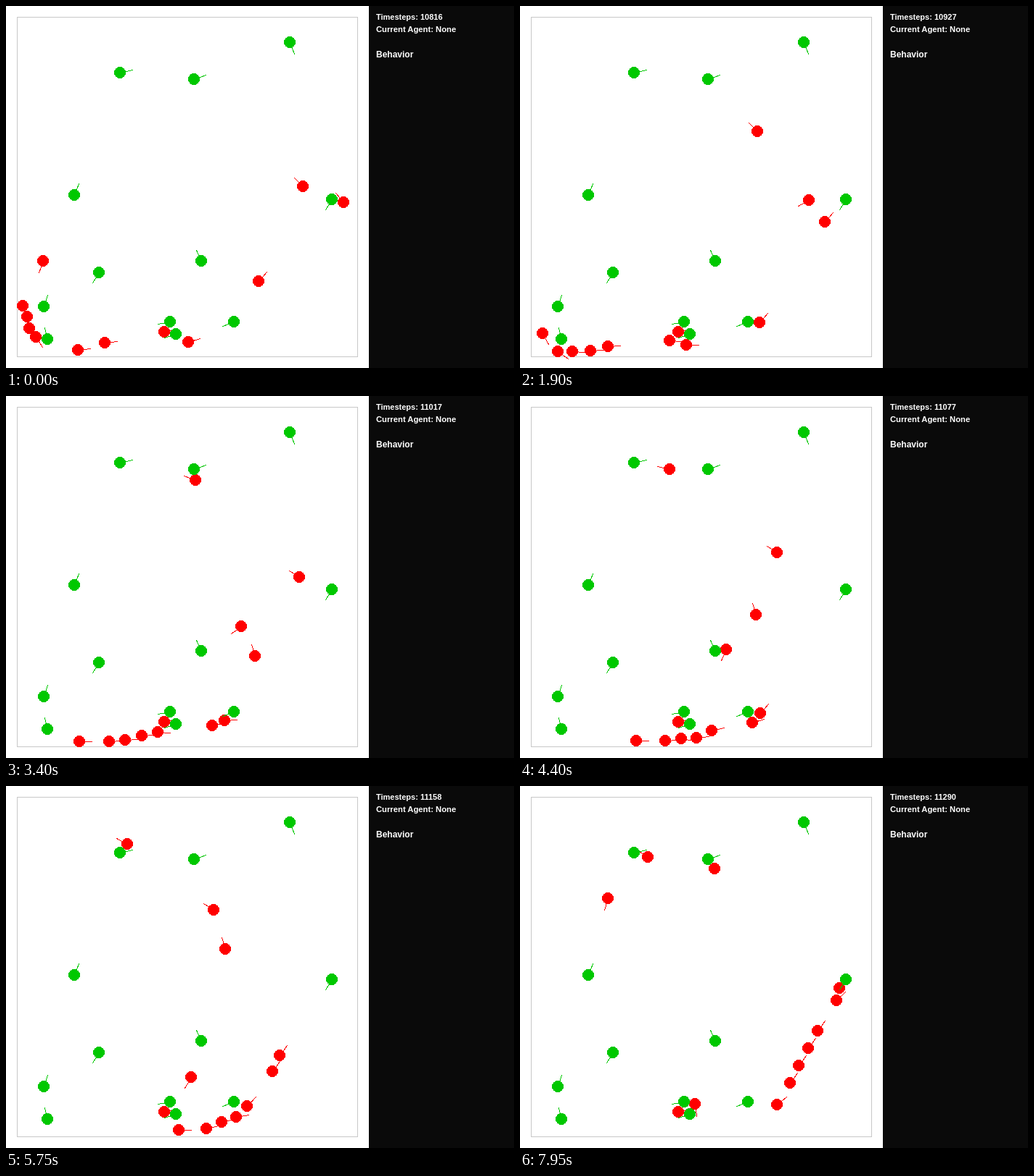
Write an HTML page that moves like this. It is 700x500 px and loops after 8000 ms.

```html
<!DOCTYPE html>
<html lang="en">
<head>
<meta charset="utf-8">
<title>Swarm</title>
<style>
  html, body { margin: 0; width: 100%; height: 100%; overflow: hidden; background: #fff; }
  svg { display: block; width: 700px; height: 500px; }
  text { font: bold 11px "Liberation Sans", Arial, sans-serif; fill: #fff; }
  line { stroke-linecap: square; }
  .agent, rect { shape-rendering: crispEdges; }
</style>
</head>
<body>
<svg viewBox="0 0 700 500">
  <rect width="700" height="500" fill="#fff"/>
  <rect x="15.5" y="15.5" width="469" height="469" fill="none" stroke="#c8c8c8"/>
  <g id="swarm"></g>
  <rect x="500" width="200" height="500" fill="#0a0a0a"/>
  <text id="count" x="510" y="19"></text>
  <text x="510" y="36" style="font-size:11.25px">Current Agent: None</text>
  <text x="510" y="71" style="font-size:12px">Behavior</text>
</svg>
<script>
const LOOP = 8000, FRAME = 50, STEPS = 3, FIRST = 10816;
const RADIUS = 8, NOSE = 17, GAP = 15.5, LOW = 22, HIGH = 477;
const ROUNDING = 8, LOOK = 6;
const swarm = document.getElementById('swarm');
const count = document.getElementById('count');
const movers = [], blocks = [];

function make(tag, attrs, parent) {
  const el = document.createElementNS('http://www.w3.org/2000/svg', tag);
  for (const name in attrs) el.setAttribute(name, attrs[name]);
  return parent.appendChild(el);
}

function sprite(color) {
  const g = make('g', { class: 'agent' }, swarm);
  make('circle', { r: RADIUS, fill: color }, g);
  return { g, nose: make('line', { x1: 0.5, y1: 0.5, stroke: color }, g) };
}

function place({ g, nose }, x, y, angle) {
  g.setAttribute('transform', `translate(${Math.round(x)} ${Math.round(y)})`);
  nose.setAttribute('x2', Math.round(NOSE * Math.cos(angle)) + 0.5);
  nose.setAttribute('y2', Math.round(NOSE * Math.sin(angle)) + 0.5);
}

function still(color, x, y, deg) {
  place(sprite(color), x, y, deg * Math.PI / 180);
  blocks.push([x, y]);
}

// A route is a few turning points [step, x, y] joined by straight legs
function red(route, lag = 0, dx = 0, dy = 0) {
  movers.push({ route, lag, dx, dy, body: sprite('#f00') });
}

function onLeg(route, step) {
  let i = 0;
  while (i < route.length - 2 && step >= route[i + 1][0]) i++;
  const [s, x, y] = route[i], [s2, x2, y2] = route[i + 1];
  const u = (step - s) / (s2 - s);
  return [x + (x2 - x) * u, y + (y2 - y) * u];
}

// Averaging over a short span rounds the corners
function along(route, step) {
  let x = 0, y = 0;
  for (let k = -2; k <= 2; k++) {
    const p = onLeg(route, step + k * ROUNDING / 2);
    x += p[0] / 5;
    y += p[1] / 5;
  }
  return [x, y];
}

const clamp = v => Math.min(HIGH, Math.max(LOW, v));

// Agents slide around standing ones and stop at the walls
function collide(x, y) {
  for (const [bx, by] of blocks) {
    const d = Math.hypot(x - bx, y - by);
    if (d > 0 && d < GAP) {
      x = bx + (x - bx) * GAP / d;
      y = by + (y - by) * GAP / d;
    }
  }
  return [clamp(x), clamp(y)];
}

function move({ route, lag, dx, dy, body }, step) {
  const t = step - lag;
  const [x, y] = along(route, t);
  const [ax, ay] = along(route, t - LOOK), [bx, by] = along(route, t + LOOK);
  place(body, ...collide(x + dx, y + dy), Math.atan2(by - ay, bx - ax));
}

red([[0, 409, 249], [196, 265, 115], [296, 174, 93], [342, 168, 79], [396, 144, 80], [474, 121, 155]]);
red([[0, 465, 271], [55, 447, 250], [111, 398, 267], [249, 285, 345], [301, 276, 366],
  [372, 240, 428], [474, 241, 439]]);
red([[0, 348, 380], [137, 437, 279], [166, 433, 269], [474, 176, 98]]);
red([[0, 251, 464], [54, 302, 447], [92, 318, 452], [152, 357, 405], [459, 268, 114], [474, 267, 113]]);
red([[0, 136, 465], [67, 203, 457], [111, 228, 469], [201, 302, 447], [232, 316, 452],
  [261, 331, 439], [451, 438, 281], [474, 440, 279]]);
red([[0, 99, 475], [111, 206, 461], [140, 232, 469], [225, 305, 449], [261, 319, 452],
  [278, 331, 445], [462, 435, 297], [474, 436, 296]]);
red([[0, 51, 352], [90, 22, 435], [141, 43, 477], [396, 291, 475], [436, 328, 463], [474, 354, 440]]);

// Four agents follow one route, each later and in a wider lane
const convoy = [[-75, 17, 402], [-50, 25, 421], [-25, 29, 441], [0, 42, 458], [38, 45, 466],
  [55, 62, 474], [111, 121, 470], [201, 209, 463], [231, 236, 469], [304, 304, 453],
  [322, 320, 453], [342, 332, 443], [474, 410, 338]];
for (let i = 0; i < 4; i++) red(convoy, 25 * i, 2 * i, 4 * i);

still('#f00', 218, 450, -15);

for (const spot of [
  [391, 50, 69], [157, 92, -13], [259, 101, -20], [94, 261, -69],
  [449, 267, 122], [269, 352, -115], [128, 368, 122], [52, 415, -73],
  [226, 436, 169], [314, 436, 160], [234, 453, 162], [57, 460, -105]
]) still('#00c800', ...spot);

function render(ms) {
  // The opening pose is held twice as long as the others
  const step = STEPS * Math.max(0, Math.floor(ms / FRAME) - 1);
  count.textContent = `Timesteps: ${FIRST + step}`;
  for (const mover of movers) move(mover, step);
}

const start = performance.now();
function tick() {
  render((performance.now() - start) % LOOP);
  requestAnimationFrame(tick);
}
tick();
</script>
</body>
</html>
```
